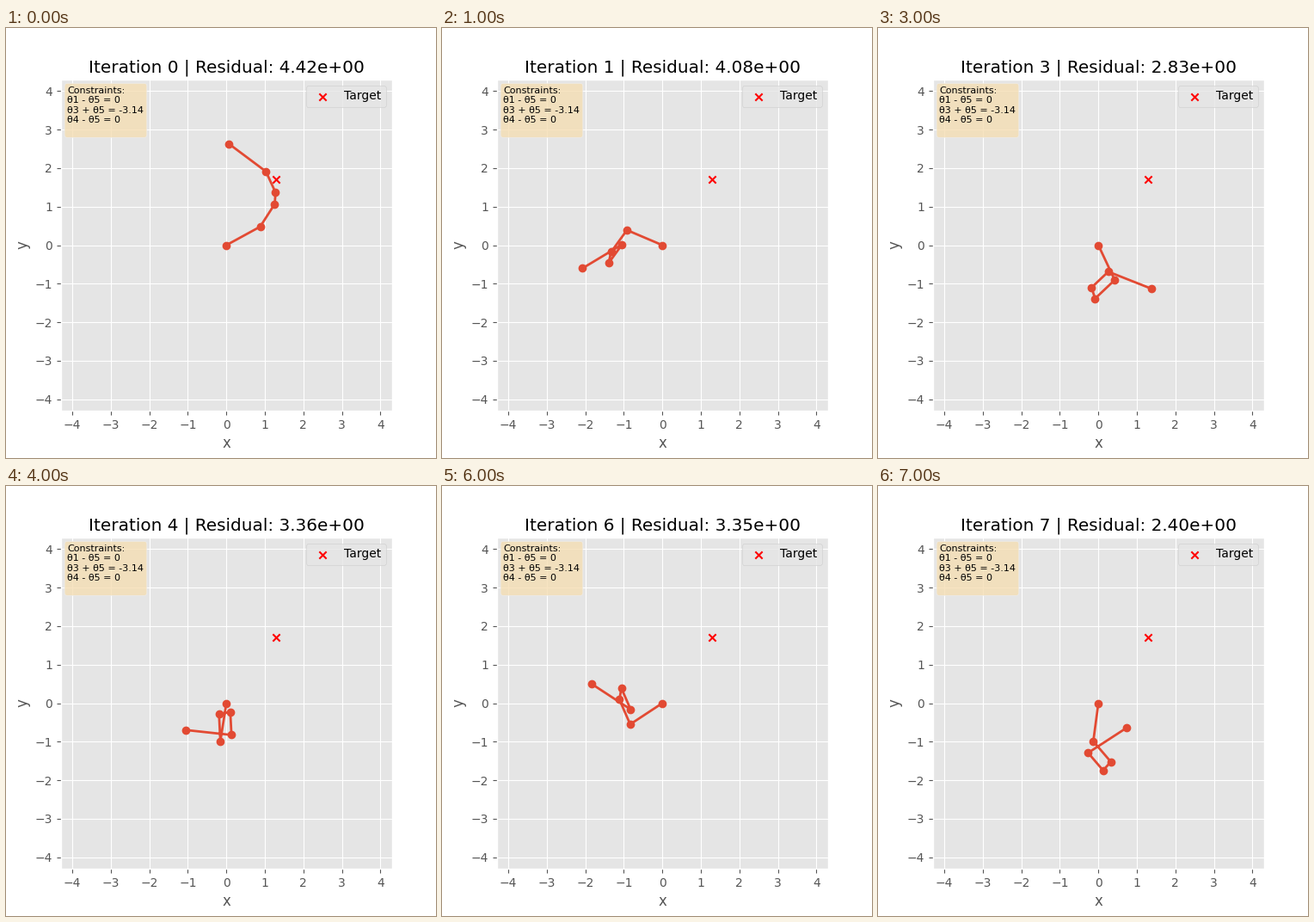
A matplotlib script that plays this animation: 500 px wide and 500 px high, repeating every 8000 ms.

```python
import numpy as np
import matplotlib.pyplot as plt
from matplotlib.animation import FuncAnimation

LINKS = np.array([1.0, 0.7, 0.3, 0.6, 1.2])
TARGET = np.array([1.3, 1.7])
STEPS = 8

# Linear joint constraints: A @ theta = b
A = np.array([[1, 0, 0, 0, -1],
              [0, 0, 1, 0, 1],
              [0, 0, 0, 1, -1]], dtype=float)
b = np.array([0, -np.pi, 0])


def joints(theta):
    """Positions of the base and every joint, one row each."""
    angles = np.cumsum(theta)
    segments = LINKS[:, None] * np.column_stack([np.cos(angles), np.sin(angles)])
    return np.vstack([[0, 0], np.cumsum(segments, axis=0)])


def residual(theta):
    return np.concatenate([joints(theta)[-1] - TARGET, A @ theta - b])


def jacobian(theta):
    points = joints(theta)
    reach = points[-1] - points[:-1]
    return np.vstack([-reach[:, 1], reach[:, 0], A])


def newton_path(theta):
    path = [theta]
    for _ in range(STEPS - 1):
        theta = theta - np.linalg.solve(jacobian(theta), residual(theta))
        path.append(theta)
    return path


path = newton_path(np.full(5, 0.5))

plt.style.use("ggplot")
fig, ax = plt.subplots(figsize=(5, 5), dpi=100)
limit = LINKS.sum() + 0.5
ax.set_xlim(-limit, limit)
ax.set_ylim(-limit, limit)
ax.set_aspect("equal")
ax.set_xlabel("x")
ax.set_ylabel("y")

arm, = ax.plot([], [], "o-", lw=2)
ax.scatter(*TARGET, color="red", marker="x", label="Target")
ax.legend(loc="upper right")
ax.text(0.02, 0.98,
        "Constraints:\nθ1 - θ5 = 0\nθ3 + θ5 = -3.14\nθ4 - θ5 = 0\n",
        transform=ax.transAxes, fontsize=8, va="top",
        bbox=dict(boxstyle="round", facecolor="wheat", alpha=0.8))
title = ax.set_title("")


def update(i):
    theta = path[i]
    arm.set_data(*joints(theta).T)
    error = np.linalg.norm(residual(theta))
    title.set_text(f"Iteration {i} | Residual: {error:.2e}")
    return arm, title


anim = FuncAnimation(fig, update, frames=STEPS, interval=1000, repeat=True)
plt.show()
```
